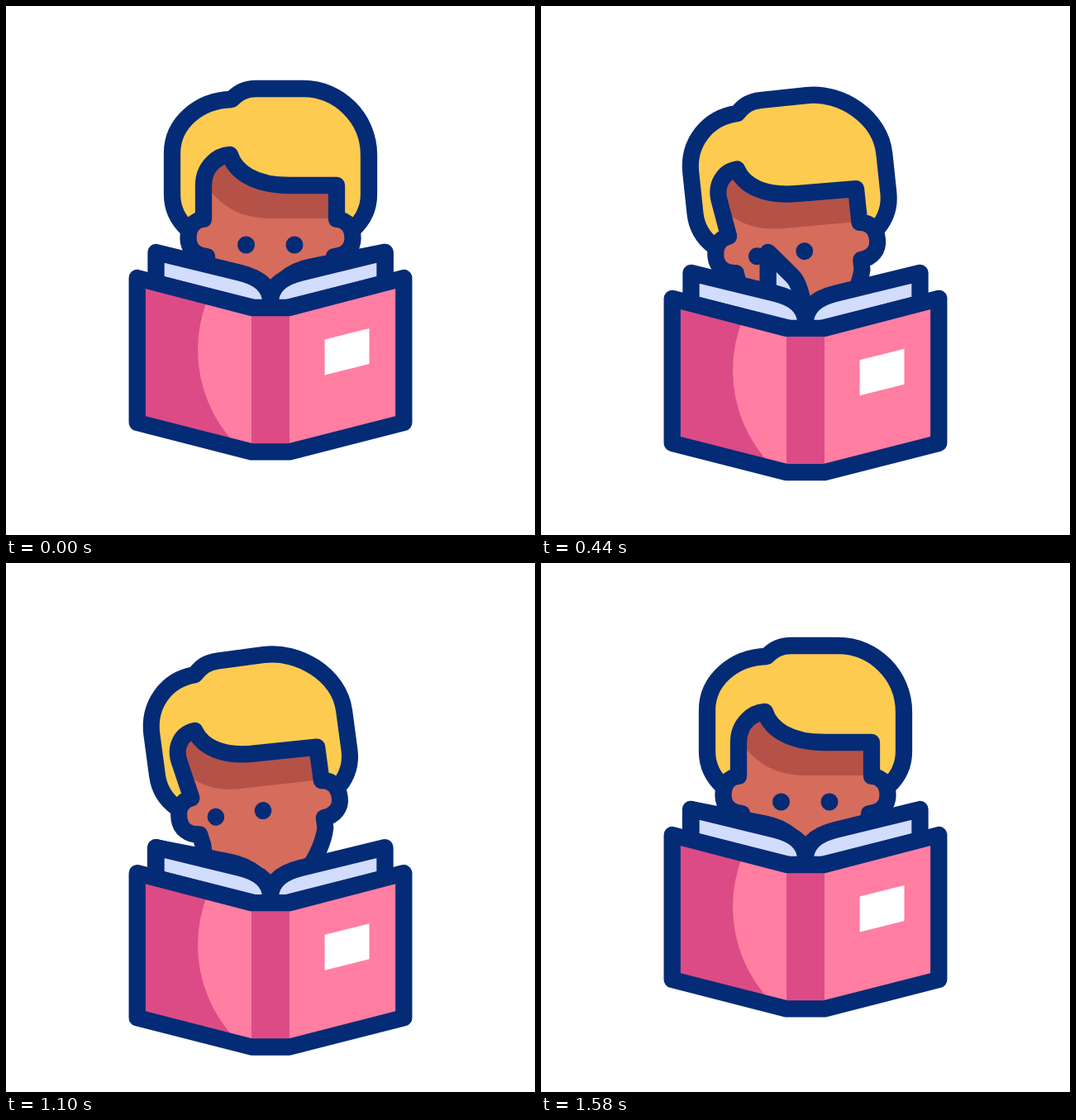
Recreate the animation shown at these times as an HTML page with a canvas. Size 640 by 640 pixels, loop 2100 ms.

```html
<!DOCTYPE html>
<html lang="en">
<head>
<meta charset="utf-8">
<title>Reading</title>
<style>
  html, body { margin: 0; height: 100%; overflow: hidden; background: #fff; }
  canvas { display: block; width: 100vw; height: 100vh; }
</style>
</head>
<body>
<canvas id="stage" width="640" height="640"></canvas>
<script>
const ctx = document.getElementById('stage').getContext('2d');
const LOOP = 2100;
const NAVY = '#042b76', HAIR = '#fdcb50', SKIN = '#d66c5c', SHADE = '#b55247',
      PAPER = '#d2dcfd', PINK = '#ff7ea1', ROSE = '#dc4b86';

const clamp = v => Math.min(1, Math.max(0, v));

// cubic-bezier(.5, 0, .5, 1)
function ease(x) {
  let lo = 0, hi = 1;
  for (let i = 0; i < 24; i++) {
    const m = (lo + hi) / 2;
    if (1.5 * m * (1 - m) + m ** 3 < x) lo = m; else hi = m;
  }
  return lo * lo * (3 - 2 * lo);
}

// Rises from 0 to 1 until peak, then falls back until end
const swing = (t, peak, end) =>
  t < peak ? ease(t / peak) : 1 - ease(clamp((t - peak) / (end - peak)));

function fill(d, color) {
  ctx.fillStyle = color;
  ctx.fill(new Path2D(d));
}

function outlined(d, color) {
  fill(d, color);
  ctx.stroke(new Path2D(d));
}

function clipped(d, draw) {
  ctx.save();
  ctx.clip(new Path2D(d));
  draw();
  ctx.restore();
}

function disc(x, y, r, color) {
  ctx.fillStyle = color;
  ctx.beginPath();
  ctx.arc(x, y, r, 0, 7);
  ctx.fill();
}

// k: 0 looks ahead, 1 is fully tilted; inner features slide further than the skull
function drawHead(k) {
  ctx.save();
  ctx.translate(413, 390);
  ctx.rotate(-10.4 * k * Math.PI / 180);
  ctx.translate(-93, -390);
  ctx.scale(1 - .02 * k, 1);
  ctx.translate(-320, 0);

  const n = 13.5 * k, s = 23 * k, chin = 315 - 12 * k, eye = 34 * k, drop = 3 * k;
  outlined(`M${273 - n} 113C${233 - n * .6} 114 201 142 201 178V228
    C201 245 207 258 220 270H420C433 258 439 245 439 228V180
    C439 136 ${403 - n} 100 ${360 - n} 100H${303 - n}
    C${290 - n} 100 ${282 - n} 104 ${273 - n} 113Z`, HAIR);

  const face = `M239 ${258 + drop}L${239 - s * .5} 217
    C${239 - s * .8} 195 ${255 - s} 181 ${271 - s} 180
    C${277 - s} 200 ${300 - s} 217 ${343 - s} 217L400 ${217 + drop}V${258 + drop}
    C414 ${259 + drop} 419.5 ${269 + drop} 419.5 ${281 + drop}
    S411 ${302 + drop} 397 ${303 + drop}V${315 + drop}
    C389 350 ${chin + 40} 398 ${chin} 398
    C${chin - 45} 398 ${243 + drop} 365 ${243 + drop} 318L243 ${303 + drop}
    C229 ${302 + drop} 220.5 ${293 + drop} 220.5 ${281 + drop}
    S226 ${259 + drop} 239 ${258 + drop}Z`;
  fill(face, SKIN);
  clipped(face, () => fill(`M${239 - s} 170V212C${258 - s} 243 ${285 - s} 257
    ${320 - s} 257L410 ${257 + drop}V170Z`, SHADE));
  ctx.stroke(new Path2D(face));

  for (const x of [290.5, 349]) disc(x - eye, 289 - drop, 10.5, NAVY);
  ctx.restore();
}

// p: 0 lies on the right, 1 lies on the left
function drawTurningPage(p) {
  const x = 459 - 278 * p, y = 298 - 112 * p * (1 - p);
  const cx = 320 + (x - 320) * .08, cy = 323 - 40 * p * (1 - p);
  const kx = x + (cx - x) * .7, ky = y + (cy - y) * .7;
  outlined(`M${x} ${y}L${kx} ${ky}Q${cx} ${cy} 320 358V370L${x} 338Z`, PAPER);
}

function drawBook() {
  outlined('M181.5 298L284 323C304 328 320 338 320 358V370L181.5 335Z', PAPER);
  outlined('M458.5 298L356 323C336 328 320 338 320 358V370L458.5 335Z', PAPER);

  const cover = 'M158.7 329L297 365H343L481.3 329V504L343 539.3H297L158.7 504Z';
  fill(cover, PINK);
  clipped(cover, () => {
    ctx.fillStyle = ROSE;
    ctx.fillRect(150, 320, 147, 230);
    clipped('M150 320H297V550H150Z', () => disc(397, 416, 165, PINK));
    ctx.fillStyle = ROSE;
    ctx.fillRect(297, 350, 46, 200);
  });
  fill('M385.6 403.5L439.5 390V433L385.6 446.5Z', '#fff');
  ctx.stroke(new Path2D(cover));
}

function frame(now) {
  const t = now % LOOP;
  ctx.fillStyle = '#fff';
  ctx.fillRect(0, 0, 640, 640);
  ctx.strokeStyle = NAVY;
  ctx.lineWidth = 20.3;
  ctx.lineJoin = 'round';

  drawHead(swing(t, 815, 1580));
  ctx.save();
  ctx.translate(0, 54.2 * swing(t, 920, 1545));
  drawTurningPage(clamp(t / 665));
  drawBook();
  ctx.restore();
}

const start = performance.now();
function tick() {
  frame(performance.now() - start);
  requestAnimationFrame(tick);
}
tick();
</script>
</body>
</html>
```
